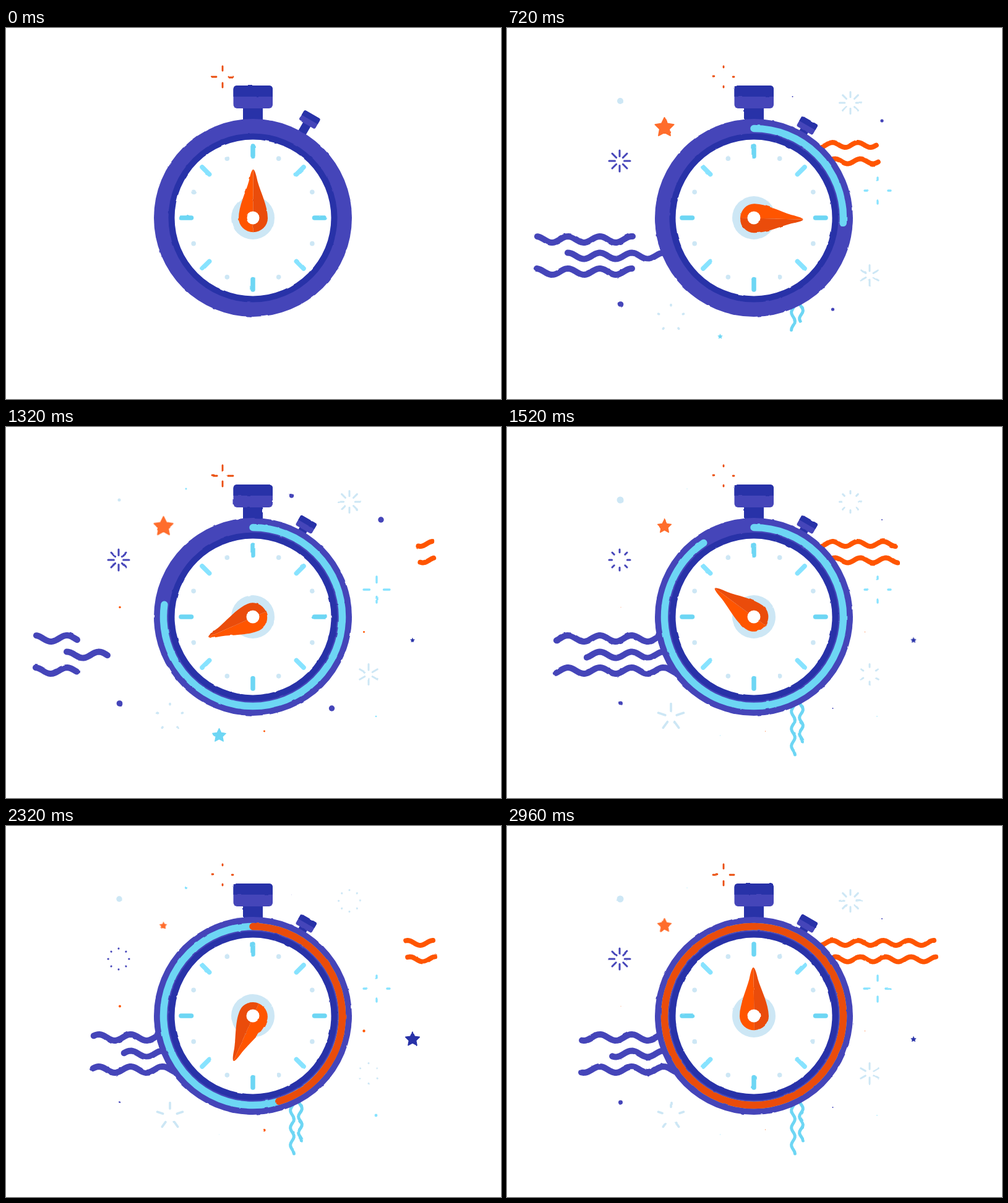
Recreate the animation shown at these times as an HTML page. Size 800x600 px, loop 3 s.

```html
<!DOCTYPE html>
<html lang="en">
<head>
<meta charset="utf-8">
<title>Stopwatch</title>
<style>
  html, body { margin: 0; width: 100%; height: 100%; overflow: hidden; background: #fff; }
  svg { display: block; width: 800px; height: 600px; }
</style>
</head>
<body>
<svg id="stage" viewBox="0 0 800 600" xmlns="http://www.w3.org/2000/svg">
  <filter id="rough" filterUnits="userSpaceOnUse" x="0" y="0" width="800" height="600" color-interpolation-filters="sRGB">
    <feTurbulence id="noise" type="fractalNoise" baseFrequency="0.07" numOctaves="1" seed="1"/>
    <feDisplacementMap in="SourceGraphic" scale="2.5" xChannelSelector="R" yChannelSelector="G"/>
  </filter>
  <g filter="url(#rough)">
    <g id="decor" fill="none" stroke-linecap="round" stroke-linejoin="round"></g>
    <g transform="translate(399 307)">
      <g transform="rotate(30)">
        <g id="button">
          <rect x="-7" y="-177" width="14" height="30" fill="#2832a8"/>
          <rect x="-15" y="-193" width="30" height="19" rx="3" fill="#4545b9"/>
          <path d="M-15 -183.500V-190q0 -3 3 -3H12q3 0 3 3V-183.500Z" fill="#2832a8"/>
        </g>
      </g>
      <rect x="-16" y="-180" width="32" height="30" fill="#2832a8"/>
      <rect x="-31.500" y="-214" width="63.500" height="37" rx="6" fill="#4545b9"/>
      <path d="M-31.500 -196V-208q0 -6 6 -6H26q6 0 6 6V-196Z" fill="#2832a8"/>
      <circle r="160" fill="#4545b9"/>
      <circle r="136.500" fill="#2832a8"/>
      <circle r="126.500" fill="#fff"/>
      <g fill="none" stroke-width="11.500" stroke-linecap="round" transform="rotate(-90)">
        <circle id="arcA" r="144.500" pathLength="360" stroke="#6dd6f4"/>
        <circle id="arcB" r="144.500" pathLength="360" stroke="#ea4c0b"/>
      </g>
      <g id="marks" stroke-width="7.500" stroke-linecap="round"></g>
      <circle r="35" fill="#cde7f5"/>
      <g transform="translate(0.500 0.700)">
        <g id="hand">
          <path d="M0 -79Q-3 -79 -7 -60C-12 -42 -23.500 -20 -23.500 0A23.500 22.500 0 0 0 0 22.500Z" fill="#ff5500"/>
          <path d="M0 -79Q3 -79 7 -60C12 -42 23.500 -20 23.500 0A23.500 22.500 0 0 1 0 22.500Z" fill="#ea4c0b"/>
        </g>
      </g>
      <circle r="10.500" fill="#fff"/>
    </g>
  </g>
</svg>
<script>
const LOOP = 3000, STEP = 40, BEAT = 720;
const PURPLE = '#4545b9', NAVY = '#2832a8', ORANGE = '#ff5500', RUST = '#ea4c0b';
const CYAN = '#6dd6f4', SKY = '#87e3ff', PALE = '#cde7f5';

const $ = id => document.getElementById(id);
const clamp = x => Math.min(1, Math.max(0, x));
const smooth = x => { x = clamp(x); return x * x * (3 - 2 * x); };
const ramp = (t, a, b) => clamp((t - a) / (b - a));
const mod = (a, n) => ((a % n) + n) % n;
const wave = (t, peak, period) => 0.5 + 0.5 * Math.cos(2 * Math.PI * (t - peak) / period);
const polar = (r, a) => [r * Math.sin(a), -r * Math.cos(a)];
const pt = ([x, y]) => x.toFixed(2) + ' ' + y.toFixed(2);

function add(parent, tag, attrs) {
  const el = document.createElementNS('http://www.w3.org/2000/svg', tag);
  for (const k in attrs) el.setAttribute(k, attrs[k]);
  return parent.appendChild(el);
}
const stroke = (color, width) => add($('decor'), 'path', { stroke: color, 'stroke-width': width });

// Dial marks
for (let i = 0; i < 8; i++) {
  const a = i * Math.PI / 4;
  add($('marks'), 'path', {
    d: `M${pt(polar(116, a))}L${pt(polar(99.5, a))}`, stroke: i % 2 ? SKY : CYAN
  });
  const [cx, cy] = polar(104.5, (Math.floor(i / 2) * 90 + (i % 2 ? 66.5 : 23.5)) * Math.PI / 180);
  add($('marks'), 'circle', { cx, cy, r: 3.8, fill: PALE });
}

// Pulsing dots and stars: x, y, radius, colour, time of peak
const starPath = 'M' + Array.from({ length: 10 }, (_, i) =>
  pt(polar(i % 2 ? 0.47 : 0.95, i * Math.PI / 5))).join('L') + 'Z';
const pulses = [
  [183, 118, 5.5, PALE, 70], [183.5, 447, 5.2, PURPLE, 660], [184, 291.5, 5.7, ORANGE, 375],
  [291, 100, 5.5, SKY, 365], [461.5, 111, 5.5, PURPLE, 460], [606, 150, 5, PURPLE, 545],
  [578.5, 331.5, 5.5, ORANGE, 365], [598, 468, 5.5, SKY, 355], [526.5, 455, 5, PURPLE, 545],
  [417.5, 492, 5.5, ORANGE, 365],
  [254.5, 161, 18, '#ff6d2c', 660, true], [344.5, 499, 15.5, CYAN, 485, true], [657, 345, 24, NAVY, 335, true]
].map(([x, y, r, fill, peak, star]) => ({
  x, y, r, peak,
  from: mod(peak - BEAT / 2 + 100, BEAT) - 100,
  el: add($('decor'), star ? 'path' : 'circle',
    star ? { d: starPath, fill, stroke: fill, 'stroke-width': 0.12 } : { r: 1, fill })
}));

// Ray bursts: each ray keeps its outer end and changes length
const burst = t => {
  const p = mod(t - 110, 740);
  return t < 110 ? 0 : 0.5 + 11 * (p < 610 ? smooth(p / 500) : 1 - smooth((p - 610) / 130));
};
const bursts = [
  [350, 79, 4, 18, RUST, 2.8, t => t < 400 ? 9 + 3 * t / 400 : 3 + 9 * wave(t, 400, 800)],
  [182, 215, 8, 18, PURPLE, 3, burst],
  [555, 121, 8, 18.5, PALE, 3, t => burst(t) * 0.9],
  [586, 400, 6, 17.5, PALE, 3, burst],
  [265, 469, 5, 22.5, PALE, 3.7, t => t < 100 ? 0 : 3 + 13 * wave(t, 400, 600)],
  [599, 263, 4, 22, SKY, 3.3, t => Math.min(t / 20, 6 + 9 * wave(t, 350, 800))]
].map(([x, y, n, r, color, width, len]) => ({ x, y, n, r, len, el: stroke(color, width) }));

// Wavy lines, drawn only between two ends
function ripple(el, from, to, point) {
  let d = '';
  if (to > from) {
    const n = Math.ceil((to - from) / 3);
    for (let i = 0; i <= n; i++) d += (i ? 'L' : 'M') + pt(point(from + (to - from) * i / n));
  }
  el.setAttribute('d', d);
}
const sway = (v, crest, period, amp) => amp * Math.cos(2 * Math.PI * (v - crest) / period);

const left = [[342, 0], [368.5, 49], [394, -1]].map(([y, dx]) => ({ y, dx, el: stroke(PURPLE, 10) }));
const right = [[189, 526, 0], [215.5, 530, 3]].map(([y, crest, dx]) => ({ y, crest, dx, el: stroke(ORANGE, 8) }));
const below = [[462.5, 447, 530, 28], [475.5, 440, 509, 26]].map(([x, top, end, period]) =>
  ({ x, top, end, period, el: stroke(CYAN, 5) }));

// Right-hand lines: head start, head end, tail start, tail end
const runs = [[440, 1418, 1050, 1360], [1360, 1744, 1669, 2525], [2560, 2940, 3200, 3600]];

function drawWaves(t) {
  const p = mod(t + 100, 680) - 100;
  const head = Math.min(49 + 1.1 * (p + 100), 49 + 2 * t);
  const tail = 49 + 0.515 * Math.max(0, p - 100);
  for (const w of left)
    ripple(w.el, Math.min(tail, 300) + w.dx, Math.min(head + w.dx, 300),
      x => [x, w.y - sway(x, 98.5, 51.5, 5)]);

  const run = runs.filter(r => t >= r[0]).pop();
  for (const w of right) {
    const x0 = 507 + w.dx, span = 183;
    const out = run ? 1 - (1 - ramp(t, run[0], run[1])) ** 2 : 0;
    const gone = run ? ramp(t, run[2], run[3]) : 0;
    ripple(w.el, x0 + span * gone, x0 + span * out, x => [x, w.y - sway(x, w.crest, 41, 4)]);
  }

  const q = mod(t + 60, BEAT) - 60;
  const grow = smooth(ramp(q, -75, 75)) * clamp(t / 200), fade = smooth(ramp(q, 200, 560));
  for (const w of below) {
    const at = k => w.top + (w.end - w.top) * k;
    ripple(w.el, at(fade), at(grow), y => [w.x + sway(y, w.end, w.period, 2.9), y]);
  }
}

// Hand angle: smooth curve through a few poses
const poses = [[120, 0], [720, 91.5], [1080, 178.5], [1520, 306.4], [1920, 437.5], [2320, 563.7], [3000, 720]];
const slope = i => i < 1 || i > poses.length - 2 ? 0 :
  (poses[i + 1][1] - poses[i - 1][1]) / (poses[i + 1][0] - poses[i - 1][0]);
function handAngle(t) {
  if (t <= poses[0][0]) return 0;
  const i = poses.findIndex(p => p[0] > t) - 1;
  const [a, ya] = poses[i], [b, yb] = poses[i + 1];
  const h = b - a, u = (t - a) / h, v = 1 - u;
  return ya + (yb - ya) * smooth(u) + h * u * v * (slope(i) * v - slope(i + 1) * u);
}

function setArc(id, k) {
  const el = $(id);
  el.setAttribute('visibility', k > 0 ? 'visible' : 'hidden');
  el.setAttribute('stroke-dasharray', k >= 1 ? 'none' : `${360 * k} 400`);
}

function draw(t) {
  $('noise').setAttribute('seed', 1 + Math.floor(t / 80) % 5);
  $('button').setAttribute('transform', `translate(0 ${11 * smooth(t / 160)})`);
  $('hand').setAttribute('transform', `rotate(${handAngle(t)})`);
  setArc('arcA', smooth(ramp(t, 160, 1840)));
  setArc('arcB', smooth(ramp(t, 1720, 3000)));
  for (const o of pulses) {
    const s = t > 0 && t >= o.from ? o.r * wave(t, o.peak, BEAT) : 0;
    o.el.setAttribute('transform', `translate(${o.x} ${o.y}) scale(${s})`);
  }
  for (const o of bursts) {
    const len = o.len(t);
    let d = '';
    for (let i = 0; len > 0 && i < o.n; i++) {
      const a = i * 2 * Math.PI / o.n, ends = [o.r - 1, o.r - Math.max(1.3, len - 1)];
      d += ends.map((r, j) => {
        const [x, y] = polar(r, a);
        return (j ? 'L' : 'M') + pt([o.x + x, o.y + y]);
      }).join('');
    }
    o.el.setAttribute('d', d);
  }
  drawWaves(t);
}

let start = null, shown = -1;
function tick(now) {
  if (start === null) start = now;
  const t = Math.floor(mod(now - start, LOOP) / STEP) * STEP;
  if (t !== shown) draw(shown = t);
  requestAnimationFrame(tick);
}
draw(0);
requestAnimationFrame(tick);
</script>
</body>
</html>
```
